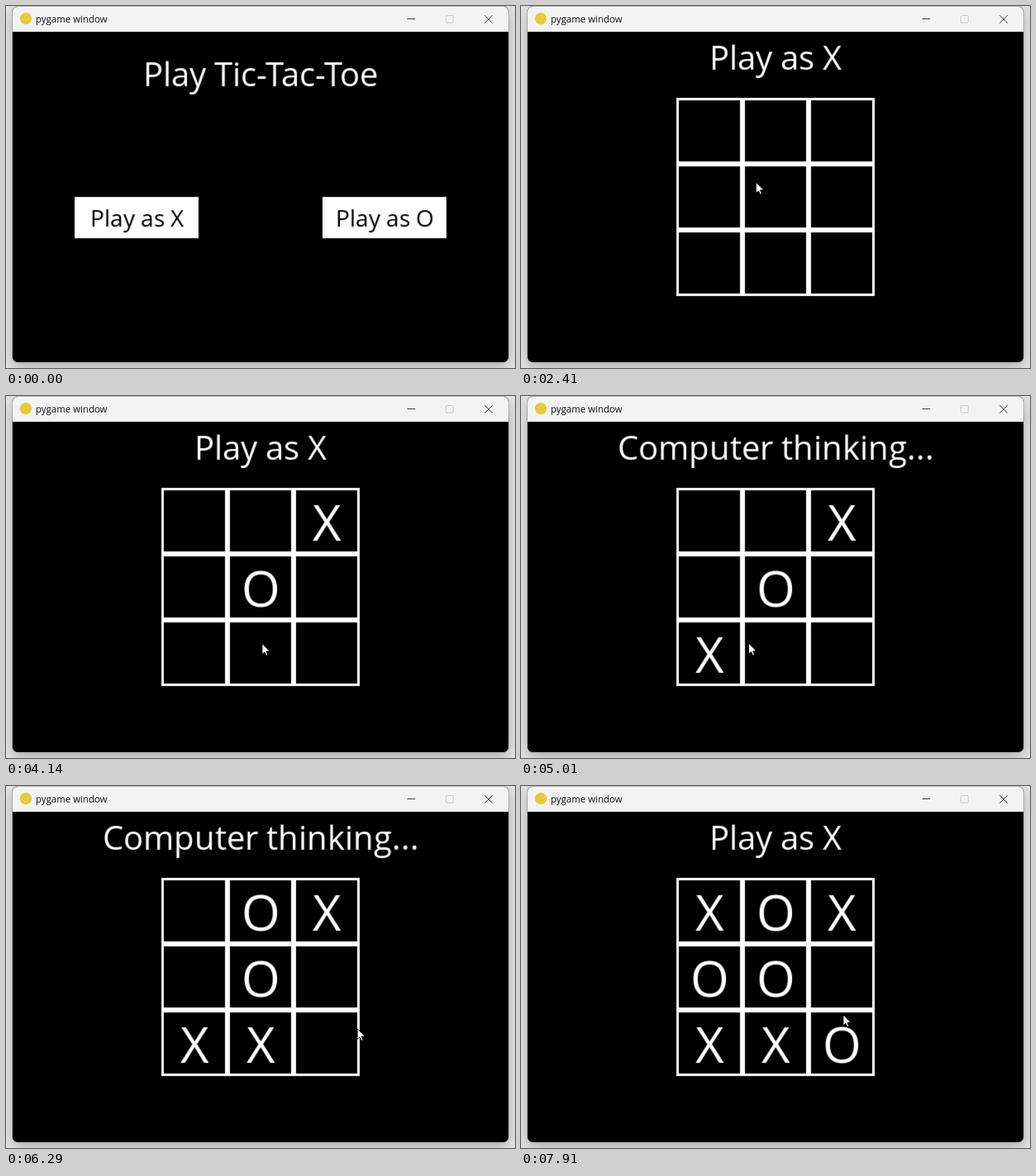
An HTML page with a canvas for the animation above (8 s loop, 770 by 548 pixels).

```html
<!DOCTYPE html>
<html lang="en">
<head>
<meta charset="utf-8">
<title>Tic-Tac-Toe</title>
<style>
html, body { margin: 0; width: 100%; height: 100%; overflow: hidden; background: #e4e4e4; }
canvas { display: block; }
</style>
</head>
<body>
<canvas id="stage" width="770" height="548"></canvas>
<script>
const LOOP = 8000, START = 1920, STEP = 80, PAUSE = 160, REPLY = 650;
const FONT = 'px "Open Sans", "Noto Sans", sans-serif';
const ctx = document.getElementById('stage').getContext('2d');

// The game is drawn at 600 x 400 and shown at 125 %.
const board = document.createElement('canvas');
board.width = 600;
board.height = 400;
const g = board.getContext('2d');

// Each turn: time of the click, player's cell, cell of the computer's reply
const moves = [[3280, 2, 4], [4770, 6, 1], [5780, 7, 8], [7050, 0, 3]].flatMap(
  ([t, mine, reply]) => [[t, 'X', mine], [t + REPLY, 'O', reply]]);

// Places where the pointer rests: arrival time, x, y
const stops = [
  [-70, 566, 536], [630, 288, 310], [870, 292, 312], [1680, 254, 337],
  [2010, 254, 337], [2240, 343, 268], [3200, 477, 202], [4210, 378, 388],
  [4530, 284, 364], [4840, 302, 376], [5010, 344, 374], [5170, 665, 410],
  [5860, 400, 361], [6290, 531, 367], [6970, 290, 195], [7130, 317, 187],
  [7910, 487, 346]
];

// After a pause the pointer goes to the next stop in even steps, sagging a little.
function pointerAt(t) {
  const next = stops.findIndex(s => s[0] > t);
  const i = next < 0 ? stops.length - 1 : next;
  const [t0, x0, y0] = stops[i - 1], [t1, x1, y1] = stops[i];
  const go = t0 + PAUSE;
  const count = Math.floor((t1 - go) / STEP) + 1;
  const done = Math.max(0, Math.floor((t - go) / STEP) + 1);
  const u = Math.min(1, done / count);
  const sag = 0.12 * Math.abs(x1 - x0) * Math.sin(Math.PI * u);
  return [x0 + (x1 - x0) * u, y0 + (y1 - y0) * u + sag];
}

// Glyphs sit on whole pixels: advances and kerning are rounded.
function label(str, size, cx, base, color = '#fff') {
  g.font = size + FONT;
  g.fillStyle = color;
  const wide = s => g.measureText(s).width;
  let x = 0;
  const places = [...str].map((ch, i) => {
    const prev = str[i - 1];
    if (prev) x += Math.round(wide(prev)) + Math.round(wide(prev + ch) - wide(prev) - wide(ch));
    return x;
  });
  const total = x + Math.round(wide(str.at(-1)));
  const left = Math.round(cx - total / 2);
  places.forEach((p, i) => g.fillText(str[i], left + p, base));
}

function drawMenu() {
  label('Play Tic-Tac-Toe', 40, 300, 66);
  ['X', 'O'].forEach((mark, i) => {
    const x = 75 + i * 300;
    g.fillStyle = '#fff';
    g.fillRect(x, 200, 150, 50);
    label('Play as ' + mark, 28, x + 75, 236, '#000');
  });
}

function drawGame(t) {
  const played = moves.filter(m => t >= m[0]);
  const thinking = played.length % 2 === 1;
  label(thinking ? 'Computer thinking...' : 'Play as X', 40, 300, 46);
  g.strokeStyle = '#fff';
  g.lineWidth = 3;
  for (let cell = 0; cell < 9; cell++) {
    const x = 180 + cell % 3 * 80, y = 80 + Math.floor(cell / 3) * 80;
    g.strokeRect(x + 1.5, y + 1.5, 77, 77);
    const move = played.find(m => m[2] === cell);
    if (move) label(move[1], 60, x + 40, y + 64);
  }
}

function line(x0, y0, x1, y1) {
  ctx.beginPath();
  ctx.moveTo(x0, y0);
  ctx.lineTo(x1, y1);
  ctx.stroke();
}

function roundBox(x, y, w, h, r) {
  ctx.beginPath();
  ctx.roundRect(x, y, w, h, r);
}

function drawWindow() {
  ctx.fillStyle = '#e4e4e4';
  ctx.fillRect(0, 0, 770, 548);
  ctx.save();
  ctx.shadowColor = 'rgba(0,0,0,.26)';
  ctx.shadowBlur = 20;
  ctx.shadowOffsetY = 6;
  roundBox(10, 1, 750, 538, 8);
  ctx.fillStyle = '#000';
  ctx.fill();
  ctx.restore();

  ctx.save();
  ctx.clip();
  ctx.fillStyle = '#f3f3f3';
  ctx.fillRect(10, 0, 750, 39);
  ctx.drawImage(board, 10, 39, 750, 500);
  ctx.restore();
  ctx.lineWidth = 1;
  ctx.strokeStyle = 'rgba(110,110,110,.45)';
  roundBox(9.5, 0.5, 751, 539, 8);
  ctx.stroke();

  ctx.fillStyle = '#e6cb3c';
  roundBox(21, 10, 18, 18, 9);
  ctx.fill();
  ctx.font = '14.3' + FONT;
  ctx.fillStyle = '#111';
  ctx.fillText('pygame window', 45, 25);

  ctx.strokeStyle = '#111';
  line(607, 19.5, 619, 19.5);
  line(724, 14, 736, 26);
  line(736, 14, 724, 26);
  ctx.strokeStyle = '#c2c2c2';
  roundBox(665.5, 14.5, 11, 11, 1.5);
  ctx.stroke();
}

const arrow = new Path2D('M0 0V16L3.7 12.7 6.2 18.2 8.6 17.2 6.2 11.7 11.3 11.4Z');

function drawPointer([x, y]) {
  ctx.save();
  ctx.translate(x + 0.5, y + 0.5);
  ctx.fillStyle = '#fff';
  ctx.strokeStyle = '#000';
  ctx.fill(arrow);
  ctx.stroke(arrow);
  ctx.restore();
}

function draw(t) {
  g.fillStyle = '#000';
  g.fillRect(0, 0, 600, 400);
  if (t < START) drawMenu();
  else drawGame(t);
  drawWindow();
  if (t >= 90) drawPointer(pointerAt(t));
}

const begin = performance.now();
function tick() {
  draw((performance.now() - begin) % LOOP);
  requestAnimationFrame(tick);
}
tick();
</script>
</body>
</html>
```
